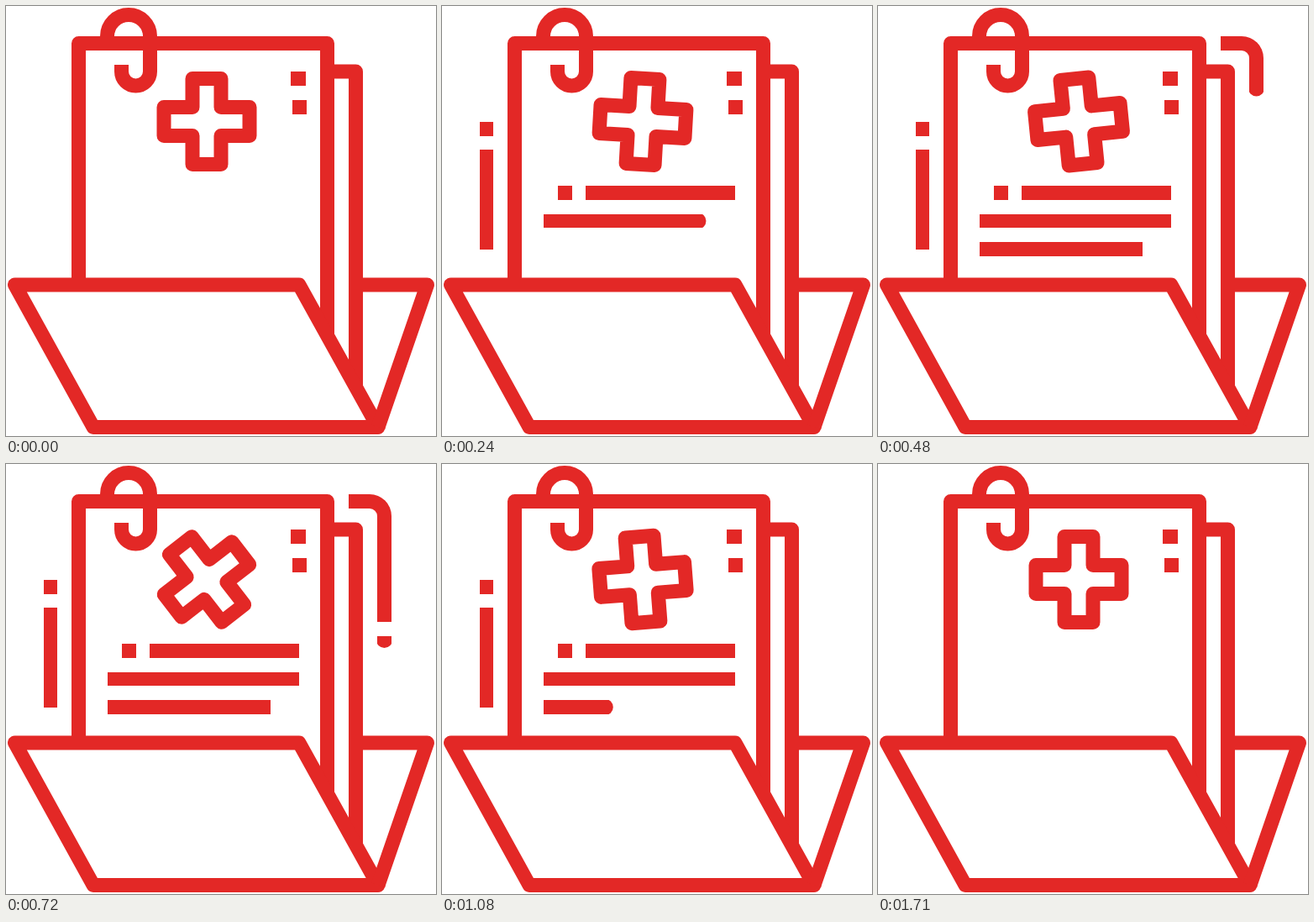
Recreate the animation shown at these times as an HTML page with a canvas. Size 512 px wide and 512 px high, loop 1830 ms.

```html
<!DOCTYPE html>
<html lang="en">
<head>
<meta charset="utf-8">
<title>Medical folder</title>
<style>
html, body { margin: 0; width: 100%; height: 100%; overflow: hidden; background: #fff; }
canvas { display: block; width: 100vw; height: 100vh; }
</style>
</head>
<body>
<canvas id="stage" width="512" height="512"></canvas>
<script>
const RED = '#e32826', SIZE = 512;
const LOOP = 1830, STEP = 30, LAST = 1710;
const ctx = document.getElementById('stage').getContext('2d');
const layer = document.createElement('canvas');
layer.width = layer.height = SIZE;
const ink = layer.getContext('2d');

// Cubic bezier easing, solved by bisection
function bezier(x1, y1, x2, y2) {
  const at = (a, b, s) => 3 * a * s * (1 - s) ** 2 + 3 * b * s * s * (1 - s) + s ** 3;
  return x => {
    if (x <= 0) return 0;
    if (x >= 1) return 1;
    let lo = 0, hi = 1;
    for (let i = 0; i < 30; i++) {
      const mid = (lo + hi) / 2;
      if (at(x1, x2, mid) < x) lo = mid; else hi = mid;
    }
    return at(y1, y2, lo);
  };
}
const growEase = bezier(0.25, 0.22, 0.25, 0.975);
const backEase = bezier(0.54, 0, 0.27, 1);
const spinEase = bezier(0.2, 0.2, 0.25, 1);

function poly(points, closed) {
  const p = new Path2D();
  points.forEach(([x, y]) => p.lineTo(x, y));
  if (closed) p.closePath();
  return p;
}

const outlines = [
  poly([[86.5, 332], [86.5, 44.5], [382.5, 44.5], [382.5, 393]]),
  poly([[386, 78], [416.5, 78], [416.5, 453]]),
  poly([[10.5, 332], [349, 332], [443, 501.5], [104, 501.5]], true),
  poly([[416.5, 332], [501.5, 332], [443, 501.5]])
];

const clip = new Path2D();
clip.moveTo(120.5, 40);
clip.lineTo(120.5, 36);
clip.arc(146, 36, 25.5, Math.PI, 0);
clip.lineTo(171.5, 78);
clip.arc(154.5, 78, 17, 0, Math.PI);
clip.lineTo(137.5, 70);

const A = 17, B = 51;
const cross = poly([
  [-A, -B], [A, -B], [A, -A], [B, -A], [B, A], [A, A],
  [A, B], [-A, B], [-A, A], [-B, A], [-B, -A], [-A, -A]
], true);

// Details that are written in and wiped out again
const details = new Path2D();
details.rect(45, 138, 16, 17);
details.rect(45, 171, 16, 119);
details.rect(138, 214, 17, 17);
details.rect(171, 214, 178, 17);
details.rect(121, 248, 228, 16);
details.rect(121, 281, 194, 17);
details.rect(442, 205, 17, 17);
details.moveTo(408, 36);
details.lineTo(433, 36);
details.arc(433, 62, 26, -Math.PI / 2, 0);
details.lineTo(459, 188);
details.lineTo(442, 188);
details.lineTo(442, 62);
details.arc(433, 62, 9, 0, -Math.PI / 2, true);
details.lineTo(408, 53);
details.closePath();

const bend = new Path2D('M398 44.5H433A17.5 17.5 0 0 1 450.5 62V218');
const brush = [
  { path: poly([[53, 300], [53, 128]]), len: 172 },
  { path: poly([[128, 222.5], [359, 222.5]]), len: 231 },
  { path: poly([[111, 256], [359, 256]]), len: 248 },
  { path: poly([[111, 289.5], [325, 289.5]]), len: 214 },
  { path: bend, len: 218 }
];
const total = brush.reduce((sum, b) => sum + b.len, 0);

function drawDetails(t) {
  let left = total * Math.min(growEase(t / 800), 1 - backEase((t - 720) / 990));
  ink.globalCompositeOperation = 'source-over';
  ink.clearRect(0, 0, SIZE, SIZE);
  ink.lineWidth = 20;
  ink.lineCap = 'round';
  for (const { path, len } of brush) {
    if (left <= 0) break;
    ink.setLineDash(left < len ? [left, 2000] : []);
    ink.stroke(path);
    left -= len;
  }
  ink.globalCompositeOperation = 'source-in';
  ink.fillStyle = RED;
  ink.fill(details);
  ctx.drawImage(layer, 0, 0);
}

function draw(t) {
  ctx.fillStyle = '#fff';
  ctx.fillRect(0, 0, SIZE, SIZE);
  ctx.strokeStyle = ctx.fillStyle = RED;
  ctx.lineWidth = 17;
  ctx.lineJoin = 'round';
  outlines.forEach(p => ctx.stroke(p));
  ctx.stroke(clip);
  ctx.fillRect(339, 78, 18, 17);
  ctx.fillRect(341, 112, 17, 17);

  ctx.save();
  ctx.translate(239, 137.5);
  ctx.rotate(Math.PI * spinEase((t - 222) / 1090));
  ctx.stroke(cross);
  ctx.restore();

  drawDetails(t);
}

const start = performance.now();
function tick() {
  const t = (performance.now() - start) % LOOP;
  draw(Math.min(LAST, Math.floor(t / STEP) * STEP));
  requestAnimationFrame(tick);
}
tick();
</script>
</body>
</html>
```
